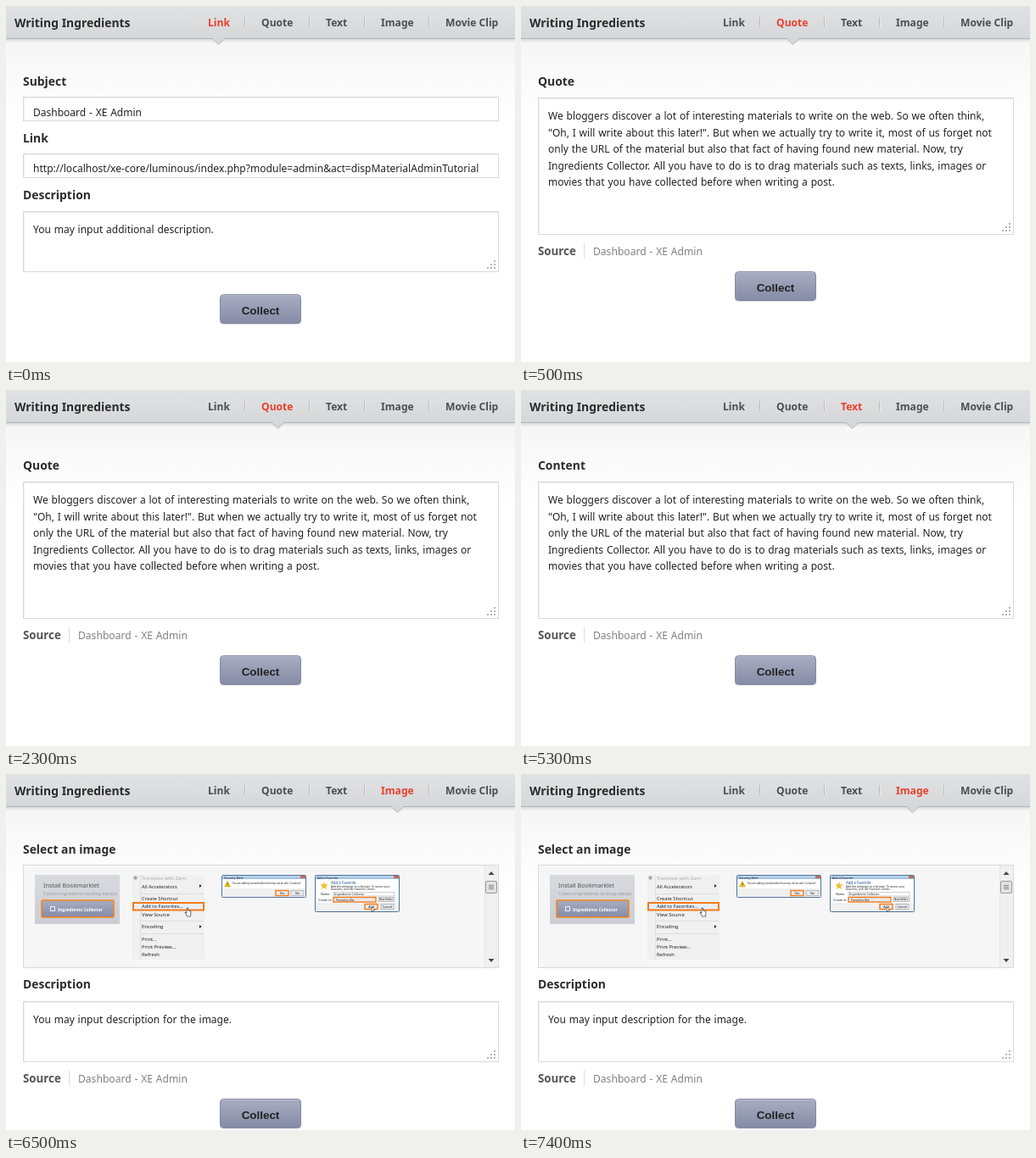
These frames come from a looping animation (600 by 420 pixels, 8 s). An HTML page:

```html
<!DOCTYPE html>
<html lang="en">
<head>
<meta charset="utf-8">
<title>Writing Ingredients</title>
<style>
html, body { margin: 0; width: 100%; height: 100%; overflow: hidden; background: #fff; }
svg { display: block; width: 600px; height: 420px; }
text { font: 12px "Noto Sans", "Open Sans", sans-serif; fill: #222; word-spacing: .7px; white-space: pre; }
.title { font-size: 13.9px; font-weight: 700; fill: #2c2c2c; word-spacing: 0; }
.tab { font-size: 12.1px; font-weight: 700; fill: #4e4e4e; word-spacing: 0; }
.on { fill: #e93f2b; }
.url { font-size: 12.06px; }
.source { font-size: 13.3px; font-weight: 700; fill: #555; }
.soft { font-size: 12.1px; fill: #808080; }
.button { font: 700 13.4px "Liberation Sans", Arial, sans-serif; fill: #222; }
.tiny { font-size: 5.8px; word-spacing: 0; }
</style>
</head>
<body>
<svg id="stage" viewBox="0 0 600 420">
  <defs>
    <linearGradient id="bar" x2="0" y2="1"><stop stop-color="#e1e2e3"/><stop offset="1" stop-color="#d6d7d9"/></linearGradient>
    <linearGradient id="page" x2="0" y2="1"><stop stop-color="#f6f6f6"/><stop offset="1" stop-color="#fff"/></linearGradient>
    <linearGradient id="shade" x2="0" y2="1"><stop stop-color="#000" stop-opacity=".1"/><stop offset="1" stop-color="#000" stop-opacity="0"/></linearGradient>
    <linearGradient id="key" x2="0" y2="1"><stop stop-color="#a8adc1"/><stop offset="1" stop-color="#858ba6"/></linearGradient>
    <linearGradient id="card" x2="0" y2="1"><stop stop-color="#d9dade"/><stop offset="1" stop-color="#cbcdd4"/></linearGradient>
    <linearGradient id="glass" x2="0" y2="1"><stop stop-color="#c4dcf2"/><stop offset="1" stop-color="#98bde0"/></linearGradient>
  </defs>
</svg>
<script>
const LOOP = 8000;
const stage = document.getElementById("stage");
const tabs = [["Link", 238, 250.5], ["Quote", 301, 320.5], ["Text", 377, 390.5], ["Image", 442, 461.5], ["Movie Clip", 518]];
const starts = [0, 500, 3500, 6500, LOOP];

function add(parent, tag, attrs = {}) {
  const el = document.createElementNS("http://www.w3.org/2000/svg", tag);
  for (const name in attrs) el.setAttribute(name, attrs[name]);
  return parent.appendChild(el);
}
const rect = (g, x, y, width, height, fill, more) => add(g, "rect", { x, y, width, height, fill, ...more });
const frame = (g, x, y, w, h, fill, stroke, more) =>
  rect(g, x + .5, y + .5, w - 1, h - 1, fill, { stroke, ...more });
const path = (g, d, fill, more) => add(g, "path", { d, fill, ...more });
function text(g, str, x, y, cls = "", more) {
  add(g, "text", { x, y, class: cls, ...more }).textContent = str;
}

function field(g, y, h) {
  frame(g, 20, y, 561, h, "#fff", "#d9d9d9");
  rect(g, 21, y + 1, 559, 1, "#eee");
  rect(g, 21, y + 1, 1, h - 2, "#f1f1f1");
}

function area(g, y, h) {
  field(g, y, h);
  for (let row = 0; row < 3; row++)
    for (let col = 2 - row; col < 3; col++)
      rect(g, 567 + col * 4, y + h - 14 + row * 4, 2, 2, "#b4b4b4");
}

function button(g, y) {
  rect(g, 252, y + 1, 96, 35, "#e6e7ec", { rx: 4 });
  frame(g, 252, y, 96, 35, "url(#key)", "#858aa3", { rx: 4 });
  rect(g, 255, y + 1, 90, 1, "#b5b9ca");
  text(g, "Collect", 300, y + 24, "button", { "text-anchor": "middle" });
}

function source(g, y) {
  text(g, "Source", 20, y, "source");
  rect(g, 74, y - 14, 1, 18, "#ddd");
  text(g, "Dashboard - XE Admin", 85, y, "soft");
}

function header() {
  rect(stage, 0, 0, 600, 420, "#fff");
  rect(stage, 0, 39, 600, 100, "url(#page)");
  rect(stage, 0, 39, 600, 5, "url(#shade)");
  rect(stage, 0, 0, 600, 38, "url(#bar)");
  rect(stage, 0, 38, 600, 1, "#b2b3b5");
  text(stage, "Writing Ingredients", 10, 25, "title");
  for (const x of [281, 357, 422, 498]) {
    rect(stage, x, 13, 1, 12, "#b9babb");
    rect(stage, x + 1, 13, 1, 12, "#e9eaea");
  }
}

function tabRow(g, active) {
  tabs.forEach(([name, x], i) => text(g, name, x, 24, i === active ? "tab on" : "tab"));
  const x = tabs[active][2];
  path(g, `M${x - 7.5} 38 L${x} 45.5 L${x + 7.5} 38 Z`, "#d6d7d9");
  path(g, `M${x - 7.5} 38.5 L${x} 45.5 L${x + 7.5} 38.5`, "none", { stroke: "#b2b3b5" });
}

function linkPage(g) {
  text(g, "Subject", 20, 94, "title");
  field(g, 107, 29);
  text(g, "Dashboard - XE Admin", 32, 130);
  text(g, "Link", 20, 161, "title");
  field(g, 174, 29);
  text(g, "http://localhost/xe-core/luminous/index.php?module=admin&act=dispMaterialAdminTutorial", 32, 196, "url");
  text(g, "Description", 20, 228, "title");
  area(g, 242, 72);
  text(g, "You may input additional description.", 32, 268);
  button(g, 340);
}

function quotePage(g, name) {
  text(g, name, 20, 94, "title");
  area(g, 108, 162);
  [
    "We bloggers discover a lot of interesting materials to write on the web. So we often think,",
    "\"Oh, I will write about this later!\". But when we actually try to write it, most of us forget not",
    "only the URL of the material but also that fact of having found new material. Now, try",
    "Ingredients Collector. All you have to do is to drag materials such as texts, links, images or",
    "movies that you have collected before when writing a post."
  ].forEach((line, i) => text(g, line, 32, Math.round(134 + i * 19.5)));
  source(g, 294);
  button(g, 313);
}

function cardThumb(g) {
  rect(g, 34, 119, 100, 58, "url(#card)");
  text(g, "Install Bookmarklet", 44, 134, "tiny", { style: "font-size:7.2px;fill:#555" });
  text(g, "Collect ingredients to blog always.", 44, 143, "tiny", { style: "font-size:5.5px;fill:#999" });
  rect(g, 42, 149, 85, 20, "url(#key)", { stroke: "#f58220", "stroke-width": 1.6, rx: 1 });
  frame(g, 52, 156, 6, 6, "none", "#eef");
  text(g, "Ingredients Collector", 61, 161.5, "tiny", { style: "font-size:5px;font-weight:700;fill:#fff" });
}

function menuThumb(g) {
  rect(g, 149, 119, 85, 100, "#f0f0f0");
  rect(g, 158, 119, 1, 100, "#e0e0e0");
  add(g, "circle", { cx: 152.5, cy: 122.5, r: 2.2, fill: "#aaa" });
  text(g, "Translate with Zarn", 160, 125, "tiny", { style: "fill:#aaa" });
  [["All Accelerators", 134.5], ["Create Shortcut", 149], ["View Source", 168], ["Encoding", 182],
   ["Print...", 197], ["Print Preview...", 206], ["Refresh", 215]]
    .forEach(([name, y]) => text(g, name, 160, y, "tiny"));
  for (const y of [141, 173, 188]) rect(g, 159, y, 74, 1, "#ddd");
  for (const y of [132, 180]) path(g, `M228 ${y - 2} l2.5 2 l-2.5 2 Z`, "#222");
  rect(g, 150, 152, 83, 8.5, "#e8eef8", { stroke: "#f47b16", "stroke-width": 2 });
  text(g, "Add to Favorites...", 160, 158.3, "tiny");
  path(g, "M213 158 v6 l-2 -1 l2.5 5 h4 l.5 -6 l-3.5 -1 v-3 Z", "#fff", { stroke: "#333", "stroke-width": .7 });
}

function dialog(g, x, h, name) {
  frame(g, x, 119, 100, h, "#fff", "#4f7399", { rx: 1 });
  rect(g, x + 1, 120, 98, 4, "url(#glass)");
  text(g, name, x + 3, 123.5, "tiny", { style: "font-size:3.6px" });
  rect(g, x + 93, 120, 6, 3, "#c66a58");
  rect(g, x + 1, 119 + h - 11, 98, 10, "#f0f0f0");
}

function key(g, x, y, name, hot) {
  rect(g, x, y, 15, 6, "#e8eaee", { stroke: hot ? "#f47b16" : "#999", "stroke-width": hot ? 1.4 : .6 });
  text(g, name, x + 7.5, y + 4.4, "tiny", { style: "font-size:3.6px", "text-anchor": "middle" });
}

function dialogThumbs(g) {
  dialog(g, 254, 27, "Security Alert");
  path(g, "M257.5 133 L261 126.5 L264.5 133 Z", "#f5c518", { stroke: "#b58a10", "stroke-width": .5 });
  rect(g, 260.7, 128.5, .7, 2.5, "#333");
  text(g, "You are adding a bookmarklet that may not be safe. Continue?", 267, 130, "tiny", { style: "font-size:2.75px" });
  key(g, 318, 137.5, "Yes", true);
  key(g, 336, 137.5, "No");

  dialog(g, 364, 44, "Add a Favorite");
  path(g, "M375 127 l1.3 3.3 l3.5 .2 l-2.7 2.2 l.9 3.4 l-3 -1.9 l-3 1.9 l.9 -3.4 l-2.7 -2.2 l3.5 -.2 Z", "#f3bf35");
  text(g, "Add a Favorite", 383, 130, "tiny", { style: "font-size:4.4px;fill:#28559b" });
  text(g, "Add this webpage as a favorite. To access your", 383, 133.7, "tiny", { style: "font-size:3.2px" });
  text(g, "favorites, visit the Favorites Center.", 383, 137, "tiny", { style: "font-size:3.2px" });
  const small = { style: "font-size:3.6px" };
  text(g, "Name:", 371, 143, "tiny", small);
  rect(g, 386, 139.5, 72, 4.5, "#fff", { stroke: "#aaa", "stroke-width": .6 });
  text(g, "Ingredients Collector", 387, 143, "tiny", small);
  text(g, "Create in:", 368, 149.5, "tiny", small);
  rect(g, 386, 145.5, 50, 5.5, "#e8eaee", { stroke: "#f47b16", "stroke-width": 1.4 });
  text(g, "Favorites Bar", 389, 149.7, "tiny", small);
  rect(g, 439, 145.7, 19, 5, "#e8eaee", { stroke: "#999", "stroke-width": .6 });
  text(g, "New Folder", 440, 149.3, "tiny", { style: "font-size:3px" });
  key(g, 423, 153.5, "Add", true);
  key(g, 442, 153.5, "Cancel");
  path(g, "M431 157 v5 l1.3 -1 l.9 1.8 l1 -.5 l-.9 -1.7 h1.6 Z", "#fff", { stroke: "#333", "stroke-width": .5 });
}

function imagePage(g) {
  text(g, "Select an image", 20, 94, "title");
  frame(g, 20, 107, 561, 122, "#f6f6f6", "#d9d9d9");
  cardThumb(g);
  menuThumb(g);
  dialogThumbs(g);
  rect(g, 564, 108, 16, 120, "#f0f0f0");
  rect(g, 564, 108, 1, 120, "#e4e4e4");
  path(g, "M568.5 119 L572 115 L575.5 119 Z", "#444");
  path(g, "M568.5 218 L572 222 L575.5 218 Z", "#444");
  frame(g, 565, 126, 14, 15, "#e2e2e2", "#999", { rx: 1.5 });
  for (let y = 131; y < 137; y += 2) rect(g, 569, y, 6, 1, "#888");
  text(g, "Description", 20, 253, "title");
  area(g, 268, 72);
  text(g, "You may input description for the image.", 32, 294);
  source(g, 364);
  button(g, 383);
}

header();
[linkPage, g => quotePage(g, "Quote"), g => quotePage(g, "Content"), imagePage].forEach((draw, i) => {
  const g = add(stage, "g", { opacity: 0 });
  tabRow(g, i);
  draw(g);
  const from = starts[i] / LOOP, to = starts[i + 1] / LOOP;
  const steps = [{ offset: from, opacity: 1 }];
  if (from > 0) steps.unshift({ offset: 0, opacity: 0 });
  if (to < 1) steps.push({ offset: to, opacity: 0 });
  steps.push({ offset: 1, opacity: to < 1 ? 0 : 1 });
  for (const step of steps) step.easing = "step-end";
  g.animate(steps, { duration: LOOP, iterations: Infinity });
});
</script>
</body>
</html>
```
